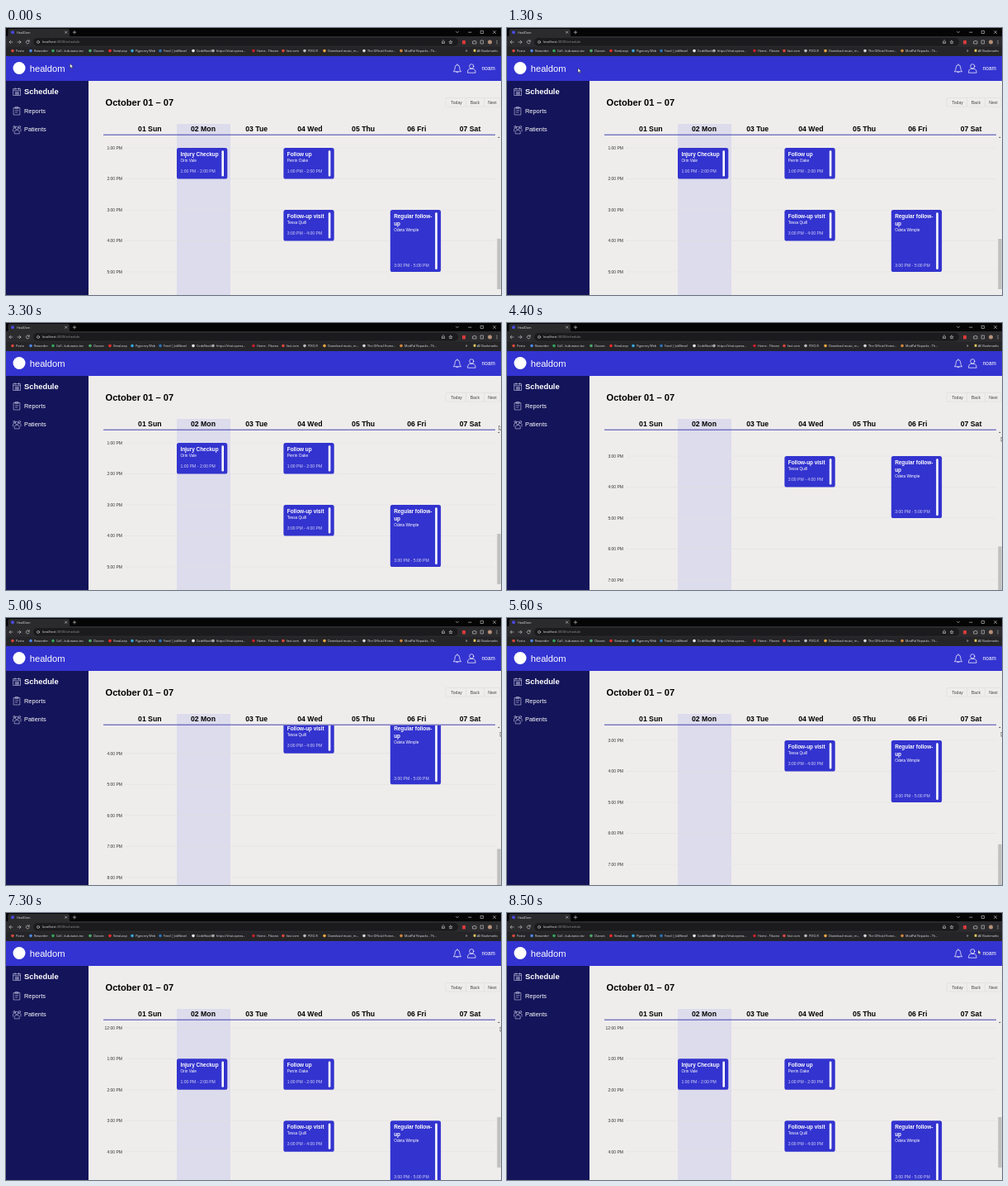
Animation of 600 by 323 pixels, one loop 8600 ms. Source, as an HTML page:

```html
<!DOCTYPE html>
<html lang="en">
<head>
<meta charset="utf-8">
<title>Weekly schedule</title>
<style>
  html, body { margin: 0; width: 100%; height: 100%; overflow: hidden; background: #efedec; }
  svg { display: block; width: 600px; height: 323px; font-family: "Liberation Sans", Arial, sans-serif; }
  .chrome { font-family: "Open Sans", "Noto Sans", sans-serif; font-size: 3.75px; fill: #e4e4e6; }
  .line { fill: none; stroke: #fff; stroke-width: .7; stroke-linecap: round; stroke-linejoin: round; }
  .thin { stroke: #d4d4d6; stroke-width: .6; }
  .faint { stroke: #c9c9e6; stroke-width: .6; }
  .bold { font-weight: 700; }
</style>
</head>
<body>
<svg viewBox="0 0 600 323">
  <defs>
    <clipPath id="bodyClip"><rect x="100" y="130" width="500" height="193"/></clipPath>
  </defs>
  <rect width="600" height="323" fill="#efedec"/>

  <!-- calendar -->
  <rect x="207" y="116" width="65" height="207" fill="#dddcec"/>
  <g clip-path="url(#bodyClip)"><g id="scroller"></g></g>
  <text class="bold" x="120.5" y="93.5" font-size="11.1">October 01 – 07</text>
  <g fill="none" stroke="#d3d1d1" stroke-width=".4">
    <rect x="533" y="84.5" width="66" height="10.5" rx="1"/>
    <path d="M557.5 84.5v10.5M579.5 84.5v10.5"/>
  </g>
  <g font-size="5.1" fill="#444" text-anchor="middle">
    <text x="546" y="91.6">Today</text><text x="568.3" y="91.6">Back</text><text x="589.5" y="91.6">Next</text>
  </g>
  <g id="days" class="bold" font-size="8.7" text-anchor="middle"></g>
  <path d="M118 129.2H593" stroke="#3030a8" stroke-width=".9"/>
  <path d="M596 133l1.3-1.5 1.3 1.5z" fill="#555"/>
  <rect id="thumb" x="595.3" width="4.4" height="61" fill="#c1c0c0"/>

  <!-- sidebar -->
  <rect y="64" width="100" height="259" fill="#14145a"/>
  <g fill="#fff">
    <text class="bold" x="22" y="80.2" font-size="9.4">Schedule</text>
    <text x="22" y="102.7" font-size="7.4">Reports</text>
    <text x="22" y="125.3" font-size="7.4">Patients</text>
  </g>
  <g class="line faint">
    <path d="M9 73.5h8.5v8H9zM9 75.7h8.5M11 72.5v2M15.5 72.5v2M11 78h4.5M11 79.8h4.5M12.2 77v4M14.4 77v4"/>
    <path d="M9.5 96.5h7.3v8.5H9.5zM11.5 95.5h3.3v2h-3.3zM11.3 99.8H15M11.3 102h2.5"/>
    <circle cx="13.2" cy="121" r="1.8"/><circle cx="10" cy="119.6" r="1.2"/><circle cx="16.4" cy="119.6" r="1.2"/>
    <path d="M10.2 127.5v-2q0-2 3-2t3 2v2zM8.5 125v-2.5q0-1 1.5-1M18 125v-2.5q0-1-1.5-1"/>
  </g>

  <!-- app header -->
  <rect y="34" width="600" height="30" fill="#3333d1"/>
  <circle cx="16" cy="48.5" r="7.5" fill="#fff"/>
  <g fill="#fff">
    <text x="28.7" y="52.5" font-size="11.2">healdom</text>
    <text x="576.8" y="51.2" font-size="6.4">noam</text>
  </g>
  <g class="line">
    <path d="M542.7 52.5q1.5-1.5 1.5-4.5 0-3.3 2.8-3.3t2.8 3.3q0 3 1.5 4.5zM545.7 53.2q1.3 1.8 2.6 0M547 44.5v-.8"/>
    <circle cx="564.3" cy="46.3" r="2.6"/>
    <path d="M559.5 53.8q0-4.3 3-4.3h3.6q3 0 3 4.3z"/>
  </g>

  <!-- browser -->
  <rect width="600" height="34" fill="#202022"/>
  <rect width="600" height="10" fill="#050506"/>
  <path d="M1 10q1.5 0 1.5-1.5V3q0-2 2-2H75q2 0 2 2v5.5q0 1.5 1.5 1.5z" fill="#2b2b2e"/>
  <rect y="10" width="600" height="13.5" fill="#2b2b2e"/>
  <rect y="23.5" width="600" height="10.5" fill="#252528"/>
  <rect x="33" y="12" width="515" height="9.8" rx="4.9" fill="#1b1b1d"/>
  <circle cx="8" cy="5.3" r="2" fill="#4a4ae0"/>
  <g class="chrome">
    <text x="13" y="6.7">HealDom</text>
    <text x="44" y="18.4" font-size="4">localhost<tspan fill="#97979b">:3000/schedule</tspan></text>
    <g id="bookmarks"></g>
    <text x="557" y="29.3" font-size="5">»</text>
    <text x="571" y="29.3">All Bookmarks</text>
  </g>
  <g class="line thin">
    <path d="M71.5 4l2.4 2.4M73.9 4l-2.4 2.4M81.2 5.2h3.6M83 3.4V7"/>
    <path d="M545.5 4.2l1.5 1.6 1.5-1.6M560.5 5.2h3.5M575.5 3.5h3v3h-3zM590.5 3.5l3.2 3.2M593.7 3.5l-3.2 3.2"/>
    <path d="M8 17H4M5.8 15.2L4 17l1.8 1.8M14 17h4M16.2 15.2L18 17l-1.8 1.8M28 16a2 2 0 1 0 .1 1.8M28.2 14.7v1.5h-1.5"/>
    <circle cx="39" cy="17" r="1.5"/>
    <path d="M528.5 16.2v2.3h3v-2.3M530 17.3v-2.8M539 15.2l.7 1.2 1.3.2-1 1 .2 1.4-1.2-.7-1.2.7.2-1.4-1-1 1.3-.2z"/>
    <path d="M566 16h1.2q.8-2 1.5 0h1.3v3h-4zM575.5 15h3v4h-3z"/>
    <path d="M566.7 25.8h2.7v3h-2.7z" fill="#e5c95e" stroke="none"/>
  </g>
  <rect x="553" y="15" width="4" height="4.5" rx=".6" fill="#d83a3a"/>
  <circle cx="586.5" cy="17" r="2.5" fill="#b58f79"/>
  <g fill="#ddd"><circle cx="595" cy="15.3" r=".5"/><circle cx="595" cy="17" r=".5"/><circle cx="595" cy="18.7" r=".5"/></g>

  <path id="pointer" d="M0 0v5.4l1.3-1.2.9 2 .9-.4-.9-1.9h1.7z" fill="#fff" stroke="#111" stroke-width=".45"/>
</svg>
<script>
const el = id => document.getElementById(id);
const shift = (x, y) => `matrix(1 0 0 1 ${x} ${y})`;
const LOOP = 8600, HOUR = 37.5, COLUMN = 64.7, LEFT = 142.3;
const hourY = hour => 145 + (hour - 13) * HOUR;

el("days").innerHTML = ["Sun", "Mon", "Tue", "Wed", "Thu", "Fri", "Sat"]
  .map((day, i) => `<text x="${174.3 + i * COLUMN}" y="125.2">0${i + 1} ${day}</text>`).join("");

const bookmarks = [
  [12, "Posto", "#d9483b"], [34, "Reworder", "#4c86e8"], [61, "Call - kub-wavo-tez", "#35a45a"],
  [106, "Classes", "#4fa866"], [130, "ViewLoop", "#f22b2b"], [157, "Pigeonry Web", "#37a6dc"],
  [191, "Feed | JobNexel", "#2d73b8"], [231, "CodeNook", "#eeeeee"], [255, "https://chat.opena…", "#aaa"],
  [304, "Home - Flixano", "#c8202a"], [340, "fast.com", "#d8473d"], [366, "PIXO-R", "#bbb"],
  [390, "Download music, m…", "#e8a642"], [438, "The Official Home…", "#d9d9d9"], [483, "ModPal Repacks - Th…", "#d3853c"]
];
el("bookmarks").innerHTML = bookmarks.map(([x, label, color]) =>
  `<circle cx="${x - 4}" cy="27.6" r="1.8" fill="${color}"/><text x="${x}" y="29.3">${label}</text>`).join("");

const clock = hour => `${(hour + 11) % 12 + 1}:00 ${hour < 12 ? "AM" : "PM"}`;

function hourRow(hour) {
  const y = hourY(hour);
  return `<path d="M143 ${y}H593" stroke="#dedcdd" stroke-width=".5"/>
    <text x="141" y="${y + 1.8}" font-size="5" text-anchor="end" fill="#333">${clock(hour)}</text>`;
}

function appointment(day, start, end, titleLines, patient) {
  const x = LEFT + day * COLUMN, y = hourY(start), height = (end - start) * HOUR;
  const title = titleLines.map((line, i) =>
    `<text class="bold" x="4.4" y="${10 + i * 8.7}" font-size="6.4">${line}</text>`).join("");
  return `<g transform="${shift(x, y)}" fill="#fff">
    <rect width="61.3" height="${height}" rx="2.6" fill="#3333cf"/>${title}
    <text x="4.4" y="${8.5 + titleLines.length * 8.7}" font-size="4.75">${patient}</text>
    <text x="4.4" y="${height - (height > HOUR ? 5.7 : 7.7)}" font-size="5.1" fill="#d2d2f4">${clock(start)} - ${clock(end)}</text>
    <rect x="54.4" y="3.3" width="2.6" height="${height - 6.2}" rx="1.1"/></g>`;
}

el("scroller").innerHTML = Array.from({ length: 14 }, (_, i) => hourRow(i + 10)).join("") +
  appointment(1, 13, 14, ["Injury Checkup"], "Orin Vale") +
  appointment(3, 13, 14, ["Follow up"], "Perrin Oake") +
  appointment(3, 15, 16, ["Follow-up visit"], "Tessa Quill") +
  appointment(5, 15, 17, ["Regular follow-", "up"], "Odeta Wimple");

// Each key is [ms, value, ...]; values are interpolated linearly.
const scrollKeys = [[4000, 0], [4400, -59], [4700, -93.75], [5450, -93.75], [5600, -72], [6200, 27], [6300, 31.25]];
const pointerKeys = [
  [0, 77.5, 43], [900, 86, 48.5], [2000, 86, 48.5], [2400, 240, 75], [2900, 560, 115],
  [3200, 597.5, 124], [3500, 597.5, 124], [3800, 599, 138], [7500, 599, 138], [8200, 571, 44.5]
];

function sample(keys, time) {
  const next = keys.findIndex(key => key[0] > time);
  if (next < 0) return keys[keys.length - 1].slice(1);
  if (next === 0) return keys[0].slice(1);
  const a = keys[next - 1], b = keys[next], k = (time - a[0]) / (b[0] - a[0]);
  return a.slice(1).map((value, i) => value + (b[i + 1] - value) * k);
}

function draw(now) {
  const time = Math.floor(now % LOOP / 100) * 100;
  const [offset] = sample(scrollKeys, time);
  el("scroller").setAttribute("transform", shift(0, offset));
  el("thumb").setAttribute("y", 255 - offset * .26);
  el("pointer").setAttribute("transform", shift(...sample(pointerKeys, time)));
}

const began = performance.now();
function tick() {
  draw(performance.now() - began);
  requestAnimationFrame(tick);
}
tick();
</script>
</body>
</html>
```
